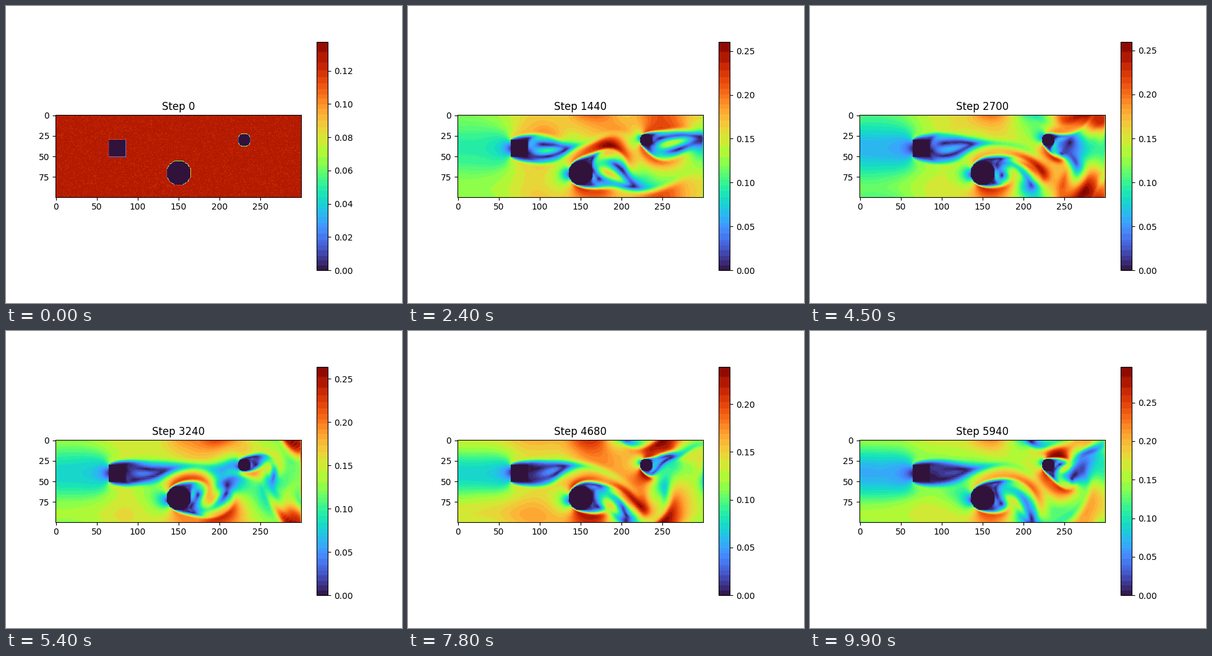
Recreate the animation shown at these times as a matplotlib script. Size 640 by 480 pixels, loop 10 s.

```python
import matplotlib.pyplot as plt
import numpy as np
from matplotlib.animation import FuncAnimation
from matplotlib.colors import ListedColormap

# Lattice Boltzmann (D2Q9) flow past a square and two discs
NX, NY = 300, 100
TAU = 0.53
FRAMES, STEPS_PER_FRAME = 100, 60
MIN_TOP = 0.1375  # lowest upper limit of the colour scale

CX = [0, 0, 1, 1, 1, 0, -1, -1, -1]
CY = [0, 1, 1, 0, -1, -1, -1, 0, 1]
OPPOSITE = [0, 5, 6, 7, 8, 1, 2, 3, 4]


def shifts(c):
    """Pairs of (target, origin) slices that roll an axis by c cells."""
    if c == 0:
        return [(slice(None), slice(None))]
    if c == 1:
        return [(slice(1, None), slice(None, -1)), (slice(0, 1), slice(-1, None))]
    return [(slice(None, -1), slice(1, None)), (slice(-1, None), slice(0, 1))]


def obstacles():
    y, x = np.mgrid[:NY, :NX]
    square = (abs(x - 75) <= 10) & (abs(y - 40) <= 10)
    large = np.hypot(x - 150, y - 70) < 15
    small = np.hypot(x - 230, y - 30) < 8
    return square | large | small


def simulate():
    """Return the speed field at every STEPS_PER_FRAME-th step."""
    rng = np.random.default_rng(1)
    f = (1 + 0.01 * rng.standard_normal((9, NY, NX))).astype(np.float32)
    f[3] = 2.3
    g = np.empty_like(f)
    g_flat = g.reshape(9, -1)

    solid = obstacles()
    cells = np.flatnonzero(solid)
    fluid = (~solid).astype(np.float32)
    moves = [(g[i, ty, tx], f[i, oy, ox])
             for i in range(9)
             for ty, oy in shifts(CY[i])
             for tx, ox in shifts(CX[i])]

    rate = 1 / TAU
    speeds = []
    for step in range((FRAMES - 1) * STEPS_PER_FRAME + 1):
        # open ends, then streaming and bounce-back
        f[6:9, :, -1] = f[6:9, :, -2]
        f[2:5, :, 0] = f[2:5, :, 1]
        for target, origin in moves:
            target[...] = origin
        g_flat[:, cells] = g_flat[:, cells][OPPOSITE]

        # density and velocity
        rho = g.sum(axis=0)
        d1 = g[2] - g[6]
        d2 = g[4] - g[8]
        ux = g[3] - g[7]
        ux += d1
        ux += d2
        uy = g[1] - g[5]
        uy += d1
        uy -= d2
        scale = fluid / rho
        ux *= scale
        uy *= scale
        u2 = ux * ux + uy * uy
        if step % STEPS_PER_FRAME == 0:
            speeds.append(np.sqrt(u2))

        # relax towards equilibrium, opposite directions in pairs
        rho *= rate
        u2 *= -1.5
        u2 += 1
        u2 *= rho
        np.multiply(g, 1 - rate, out=f)
        f[0] += u2 * (4 / 9)
        for i, w, cu in ((1, 1 / 9, uy), (3, 1 / 9, ux),
                         (2, 1 / 36, ux + uy), (4, 1 / 36, ux - uy)):
            odd = cu * rho
            odd *= 3 * w
            even = odd * cu
            even *= 1.5
            even += u2 * w
            f[i] += even
            f[i] += odd
            f[i + 4] += even
            f[i + 4] -= odd
    return speeds


TURBO = plt.get_cmap("turbo")(np.arange(256))[:, :3]
_, BAND = np.unique(np.floor(TURBO * 255 / [32, 16, 32]) @ [1, 100, 10000],
                    return_inverse=True)


def banded_turbo(speed, top):
    """Turbo in flat bands, each the mean of the shades in use."""
    shade = np.minimum(speed.ravel() / top * 256, 255).astype(int)
    weight = 26 + 1.75 * np.bincount(shade, minlength=256)
    total = np.bincount(BAND, weight)
    bands = [np.bincount(BAND, weight * channel) / total for channel in TURBO.T]
    return ListedColormap(np.clip(np.transpose(bands)[BAND], 0, 1))


speeds = simulate()

fig, ax = plt.subplots(figsize=(6.4, 4.8), dpi=100)
image = ax.imshow(speeds[0], cmap="turbo", vmin=0, vmax=MIN_TOP)
fig.colorbar(image)
title = ax.set_title("Step 0")


def update(frame):
    speed = speeds[frame]
    top = max(float(speed.max()), MIN_TOP)
    image.set_data(speed)
    image.set_clim(0, top)
    image.set_cmap(banded_turbo(speed, top))
    title.set_text(f"Step {frame * STEPS_PER_FRAME}")
    return image, title


anim = FuncAnimation(fig, update, frames=FRAMES, interval=100, repeat=True,
                     repeat_delay=0, blit=False)
plt.show()
```
